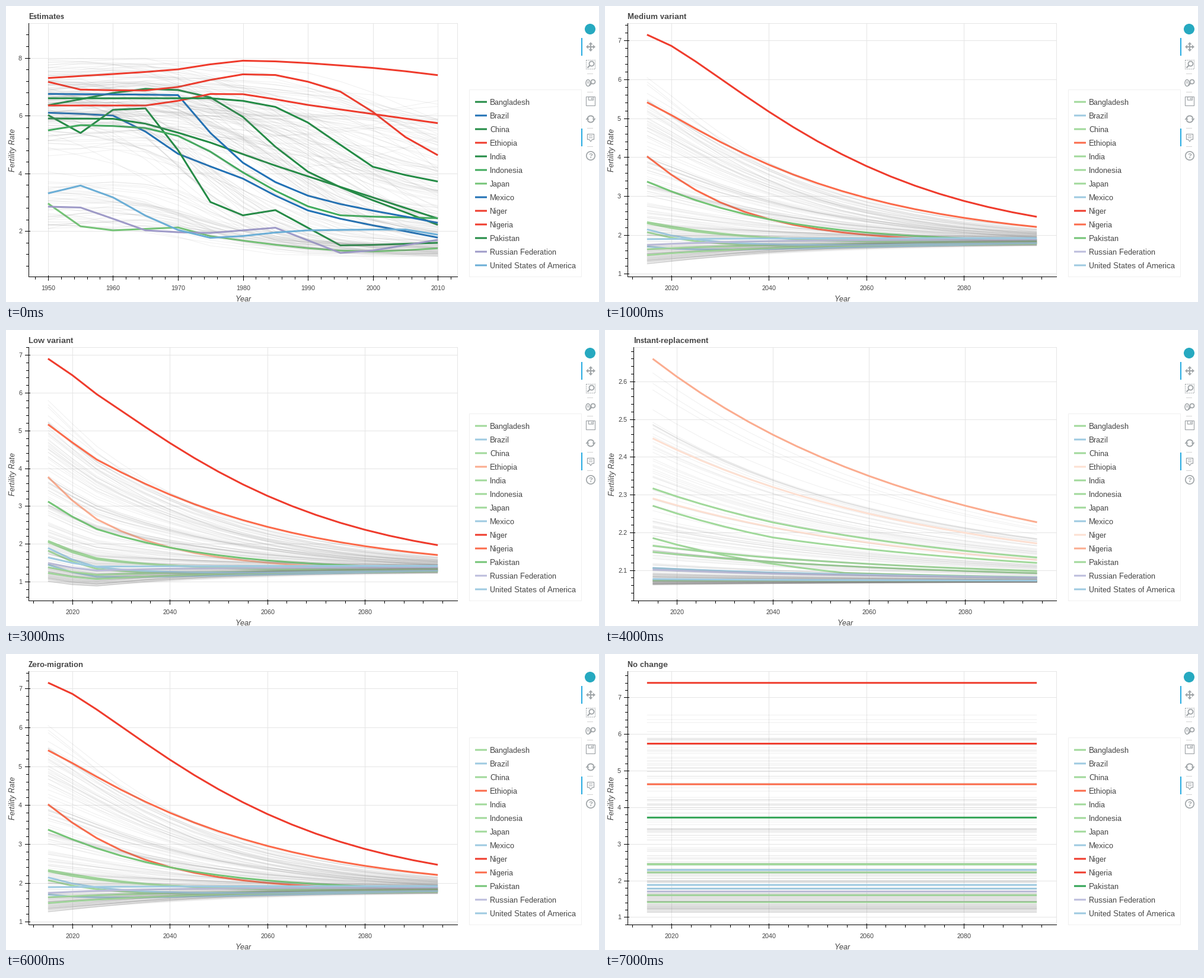
Write a matplotlib script that moves like this. It is 1000x500 px and loops after 8 s.

```python
import numpy as np
import matplotlib.pyplot as plt
from matplotlib.animation import FuncAnimation
from matplotlib.patches import Circle, Ellipse, Polygon, Rectangle

W, H, DPI = 1000, 500, 100
PX = 72 / DPI
TOP, BOTTOM, RIGHT = 29, 457, 761
INK, GRID, ICON = "#444444", "#e5e5e5", "#a1a6a9"

PAST = np.arange(1950, 2011, 5)
FUTURE = np.arange(2015, 2096, 5)
T = FUTURE - 2015
SPREAD = np.clip(.25 + .03 * T, 0, .5)

FOREST, LEAF, MINT, PALE_GREEN = "#238b45", "#41ab5d", "#74c476", "#a1d99b"
RED, CORAL, SALMON, BLUSH = "#ef3b2c", "#fb6a4a", "#fbac8f", "#fde0d2"
BLUE, SKY, PALE_BLUE = "#2171b5", "#6baed6", "#9ecae1"
PURPLE, LILAC = "#9e9ac8", "#bcbddc"

plt.rcParams.update({"font.family": "Liberation Sans", "toolbar": "None",
                     "text.hinting": "native", "text.hinting_factor": 1})
fig = plt.figure(figsize=(W / DPI, H / DPI), dpi=DPI, facecolor="white")
ax = fig.add_axes([0, 0, 1, 1])


# ---------- data ----------

def history(keys):
    """Smooth monotone curve through a few {year: rate} points."""
    x, y = np.array(list(keys)), np.array(list(keys.values()))
    h, d = np.diff(x), np.diff(y) / np.diff(x)
    a, b = d[:-1], d[1:]
    same = a * b > 0
    inner = np.where(same, 2 * a * b / np.where(same, a + b, 1), 0)
    m = np.concatenate([d[:1], inner, d[-1:]])
    i = np.clip(np.searchsorted(x, PAST, "right") - 1, 0, len(h) - 1)
    s = (PAST - x[i]) / h[i]
    return (y[i] + (y[i + 1] - y[i]) * s * s * (3 - 2 * s)
            + h[i] * s * (1 - s) * (m[i] * (1 - s) - m[i + 1] * s))


def relax(start, goal, tau, power=1, drift=0):
    """Decay from start towards a goal that may drift."""
    return goal + drift * T / 80 + (start - goal) * np.exp(-(T / tau) ** power)


def settle(start, end=None, years=25, rise=0):
    """Straight run to a level, then a slow straight rise."""
    end = start if end is None else end
    return (start + (end - start) * np.clip(T / years, 0, 1)
            + rise * np.clip((T - years) / (80 - years), 0, 1))


named = []


def country(name, order, past_color, color, keys, medium, momentum):
    named.append(dict(name=name, order=order, past_color=past_color, color=color,
                      past=history(keys), medium=medium, momentum=momentum))


country("Bangladesh", 15, FOREST, PALE_GREEN,
        {1950: 6.36, 1967: 6.94, 1975: 6.63, 1990: 4.06, 2010: 2.22},
        relax(2.07, 1.63, 12, drift=.14), settle(2.173, rise=.011))
country("Brazil", 25, BLUE, PALE_BLUE,
        {1950: 6.1, 1960: 6.0, 1970: 4.68, 1980: 3.82, 1990: 2.72, 2010: 1.78},
        relax(1.70, 1.56, 8, drift=.23), settle(2.108))
country("China", 37, FOREST, PALE_GREEN,
        {1950: 6.02, 1955: 5.4, 1960: 6.2, 1965: 6.25, 1975: 3.01, 1980: 2.55,
         1985: 2.73, 1995: 1.51, 2010: 1.6},
        relax(1.63, 1.82, 32), settle(2.195, 2.118, years=40))
country("Ethiopia", 62, RED, CORAL,
        {1950: 7.17, 1955: 6.9, 1965: 6.87, 1982: 7.45, 1995: 6.83, 2005: 5.26,
         2010: 4.63},
        relax(4.02, 1.80, 19.5, 1.05), settle(2.309, 2.306))
country("India", 85, FOREST, PALE_GREEN,
        {1950: 5.9, 1960: 5.89, 1970: 5.41, 1985: 4.27, 2010: 2.44},
        relax(2.33, 1.79, 19, 1.1), settle(2.288, 2.262, rise=.011))
country("Indonesia", 86, LEAF, PALE_GREEN,
        {1950: 5.49, 1955: 5.67, 1965: 5.57, 1970: 5.3, 1985: 3.4, 1995: 2.55,
         2010: 2.45},
        relax(2.30, 1.82, 17), settle(2.155, rise=.006))
country("Japan", 92, MINT, PALE_GREEN,
        {1950: 2.96, 1955: 2.17, 1960: 2.03, 1970: 2.13, 1975: 1.83, 2000: 1.3,
         2010: 1.41},
        relax(1.48, 1.80, 30), settle(2.073))
country("Mexico", 116, BLUE, PALE_BLUE,
        {1950: 6.75, 1970: 6.71, 1975: 5.4, 1980: 4.37, 1990: 3.23, 2010: 2.29},
        relax(2.14, 1.66, 12, drift=.13), settle(2.109, rise=.006))
country("Niger", 131, RED, RED,
        {1950: 7.3, 1970: 7.6, 1980: 7.9, 2000: 7.65, 2010: 7.4},
        relax(7.15, 1.87, 44.3, 1.32), settle(2.482, rise=.003))
country("Nigeria", 132, RED, CORAL,
        {1950: 6.35, 1965: 6.35, 1977: 6.78, 1990: 6.37, 2010: 5.74},
        relax(5.41, 1.80, 40, 1.13), settle(2.711, rise=.0055))
country("Pakistan", 138, FOREST, MINT,
        {1950: 6.6, 1975: 6.6, 1985: 6.3, 1995: 4.99, 2000: 4.23, 2010: 3.72},
        relax(3.37, 1.80, 26, 1.06), settle(2.338, 2.328, rise=.003))
country("Russian Federation", 151, PURPLE, LILAC,
        {1950: 2.85, 1955: 2.82, 1965: 2.03, 1975: 1.94, 1985: 2.12, 1995: 1.25,
         2010: 1.7},
        relax(1.74, 1.88, 20), settle(2.104, rise=.008))
country("United States of America", 185, SKY, PALE_BLUE,
        {1950: 3.31, 1955: 3.58, 1965: 2.54, 1975: 1.77, 1990: 2.03, 2005: 2.06,
         2010: 1.88},
        relax(1.89, 1.92, 30), settle(2.077, rise=.002))


def make_others(n=188):
    """Background countries, each set by its rank q in today's fertility."""
    rng = np.random.default_rng(12)
    years = PAST - 1950
    others = []
    for q in rng.random(n):
        last = 1.13 + 1.5 * q + 3.95 * q ** 3.2
        if q < .35 and rng.random() < .62:
            first, mid = rng.uniform(2.05, 3.6), rng.uniform(18, 32)
        else:
            first = np.clip(rng.normal(6.4, .75), 4, 7.9)
            mid = 18 + 38 * q + rng.normal(0, 5)
        step = 1 / (1 + np.exp(-(years - mid) / rng.uniform(6, 10)))
        step = (step - step[0]) / (step[-1] - step[0])
        bumps = np.cumsum(rng.normal(0, .07, len(years)))
        bumps += rng.uniform(0, .6) * np.exp(-((years - 17) / 11) ** 2)
        past = first + (last - first) * step + bumps * (1 - years / 60)

        medium = relax(1.13 + .89 * (last - 1.13) + .12, rng.uniform(1.75, 1.93),
                       rng.uniform(30, 39), 1.13)
        level = 2.06 + .05 * q + .575 * q ** 6
        bend, rise = rng.uniform(0, .05, 2) * (level - 2.06)
        momentum = level - bend * np.sin(np.pi * T / 80) + rise * T / 80
        others.append(dict(past=np.clip(past, .83, 8.8), medium=medium,
                           momentum=momentum))
    return others


others = make_others()


def past(c):
    return c["past"]


def medium(c):
    return c["medium"]


def replaced(c):
    return 2.07 + (c["momentum"] - 2.07) * .92 * np.exp(-T / 60)


def flat(c):
    return np.full(len(T), c["past"][-1])


REPLACE = {"Ethiopia": BLUSH, "Niger": BLUSH, "Nigeria": SALMON, "Pakistan": PALE_GREEN}

# title, series, data low, data high, y step, colour changes
VARIANTS = [
    ("Estimates", past, .83, 8.8, 2, {}),
    ("Medium variant", medium, 1.225, 7.15, 1, {}),
    ("High variant", lambda c: c["medium"] + SPREAD, 1.475, 7.4, 1, {}),
    ("Low variant", lambda c: c["medium"] - SPREAD, .805, 6.9, 1, {"Ethiopia": SALMON}),
    ("Instant-replacement", replaced, 2.05, 2.66, .1, REPLACE),
    ("Momentum", lambda c: c["momentum"], 2.0484, 2.7173, .1, REPLACE),
    ("Zero-migration", medium, 1.225, 7.15, 1, {}),
    ("No change", flat, 1.112, 7.405, 1, {"Nigeria": RED, "Pakistan": "#31a354"}),
]


# ---------- drawing helpers, all in pixels ----------

def line(xs, ys, color, width=1, z=2, **kw):
    ax.plot(xs, ys, color=color, lw=width * PX, zorder=z, snap=False,
            solid_capstyle="butt", solid_joinstyle="round", **kw)


def crisp(v):
    return np.round(v) + .5


def hline(x0, x1, y, color, **kw):
    line([x0, x1], [crisp(y)] * 2, color, **kw)


def vline(x, y0, y1, color, **kw):
    line([crisp(x)] * 2, [y0, y1], color, **kw)


def label(x, y, s, size, ha="left", **kw):
    ax.text(x, y, s, fontsize=size * PX, color=INK, ha=ha, va="baseline",
            zorder=400, **kw)


def shape(patch, fill="none", edge="none", width=1):
    patch.set(facecolor=fill, edgecolor=edge, linewidth=width * PX, zorder=400,
              snap=False)
    ax.add_patch(patch)


def ticks(lo, hi, step):
    """Minor tick values with a flag for the major ones."""
    minor = step / 5
    for k in range(int(np.ceil(lo / minor)), int(np.floor(hi / minor)) + 1):
        yield k * minor, k % 5 == 0


def lens(x, y, r):
    shape(Circle((x, y), r), "white", ICON, 1.8)
    line([x - .7 * r, x - r - 3], [y + .7 * r, y + r + 3], ICON, 2.2, z=401)


def toolbar():
    shape(Circle((985, 39), 9), "#26a9c0")
    for y in (54, 207):
        shape(Rectangle((970, y), 2, 30), "#26aae1")
    for y in (114, 145, 206, 237):
        hline(980, 990, y, "#d3d3d3")

    # pan
    line([980, 992], [69, 69], ICON, 2)
    line([986, 986], [63, 75], ICON, 2)
    for dx, dy in ((1, 0), (-1, 0), (0, 1), (0, -1)):
        tip = np.array([986 + 8 * dx, 69 + 8 * dy])
        back = tip - 4 * np.array([dx, dy])
        side = 3.5 * np.array([dy, dx])
        shape(Polygon([tip, back + side, back - side]), ICON)

    # box zoom
    line([978.5, 993.5, 993.5, 978.5, 978.5], [91.5, 91.5, 106.5, 106.5, 91.5],
         ICON, 1, dashes=(2, 1.4))
    lens(987.5, 97.5, 4)

    # wheel zoom
    shape(Ellipse((981.5, 130), 7, 11), "none", ICON, 1.5)
    line([981.5, 981.5], [127, 131], ICON, 1.5)
    lens(990, 128, 3.5)

    # save
    shape(Rectangle((978.5, 153.5), 15, 15), "none", ICON, 1.2)
    shape(Rectangle((982.5, 153.5), 8, 5.5), "none", ICON, 1.2)
    line([988, 988], [155, 158], ICON, 1.5)

    # reset
    a = np.linspace(np.pi + .25, 2 * np.pi - .25, 20)
    for s in (1, -1):
        line(986 + 5.5 * s * np.cos(a), 191 + 5.5 * s * np.sin(a), ICON, 2)
        shape(Polygon([(986 + s * x, 191 + s * y)
                       for x, y in ((2.5, -1), (8.5, -1), (5.5, 3))]), ICON)

    # hover
    shape(Polygon([(980.5, 216.5), (991.5, 216.5), (991.5, 225.5), (988.5, 225.5),
                   (986, 229), (983.5, 225.5), (980.5, 225.5)]), "none", ICON, 1.3)
    for y in (219, 222):
        hline(983, 989, y, ICON)

    # help
    shape(Circle((986, 253), 7.2), "none", ICON, 1.7)
    ax.text(986, 257.2, "?", fontsize=11.5 * PX, color=ICON, weight="bold",
            ha="center", va="baseline", zorder=401)


def legend(colors):
    shape(Rectangle((781.5, 141.5), 189, 316), "white", "#f0f0f0")
    for i, c in enumerate(named):
        y = 162 + 23 * i
        line([791, 811], [y, y], colors[c["name"]], 3, z=401)
        label(816, y + 5, c["name"], 13)


def draw(i):
    title, series, lo, hi, ystep, changes = VARIANTS[i]
    ax.clear()
    ax.set(xlim=(0, W), ylim=(H, 0))
    ax.axis("off")

    is_past = series is past
    years, xstep = (PAST, 10) if is_past else (FUTURE, 20)
    left = 48 if ystep < 1 else 38
    pad_x = (RIGHT - left) / 22
    pad_y = (BOTTOM - TOP) / 22
    span = years[-1] - years[0]

    def sx(v):
        return left + pad_x + (v - years[0]) / span * 20 * pad_x

    def sy(v):
        return TOP + pad_y + (hi - v) / (hi - lo) * 20 * pad_y

    # grid, ticks and tick labels
    hline(left, RIGHT + 1, TOP, GRID)
    vline(RIGHT, TOP, BOTTOM, GRID)
    for v, major in ticks(years[0] - span / 20, years[-1] + span / 20, xstep):
        x = sx(v)
        if major:
            vline(x, TOP, BOTTOM, GRID)
            label(np.round(x), 480, f"{v:.0f}", 11, "center")
        vline(x, BOTTOM - 2 * major, BOTTOM + (7 if major else 5), "black", z=300)
    margin = (hi - lo) / 20
    for v, major in ticks(lo - margin, hi + margin, ystep):
        y = sy(v)
        if major:
            hline(left, RIGHT, y, GRID)
            label(left - 11, np.round(y) + 4, f"{v:.{int(ystep < 1)}f}", 11, "right")
        hline(left - (6 if major else 4), left + 3 * major, y, "black", z=300)
    vline(left, TOP, BOTTOM + 1, "black", z=300)
    hline(left, RIGHT + 1, BOTTOM, "black", z=300)

    # series, stacked in alphabetical order
    xs = sx(years)
    for k, c in enumerate(others):
        line(xs, sy(series(c)), "#808080", 1, z=10 + k, alpha=.12)
    colors = {}
    for c in named:
        color = c["past_color"] if is_past else changes.get(c["name"], c["color"])
        colors[c["name"]] = color
        line(xs, sy(series(c)), color, 3, z=10.5 + c["order"])

    label(left, 22, title, 13, weight="bold")
    label((left + RIGHT) / 2 + 1, 499, "Year", 13, "center", style="italic")
    label(15 if left == 38 else 16, 243, "Fertility Rate", 13, "center",
          style="italic", rotation=90, rotation_mode="anchor")
    legend(colors)
    toolbar()
    return []


anim = FuncAnimation(fig, draw, frames=len(VARIANTS), interval=1000,
                     init_func=lambda: draw(0), repeat=True, repeat_delay=0)
plt.show()
```
